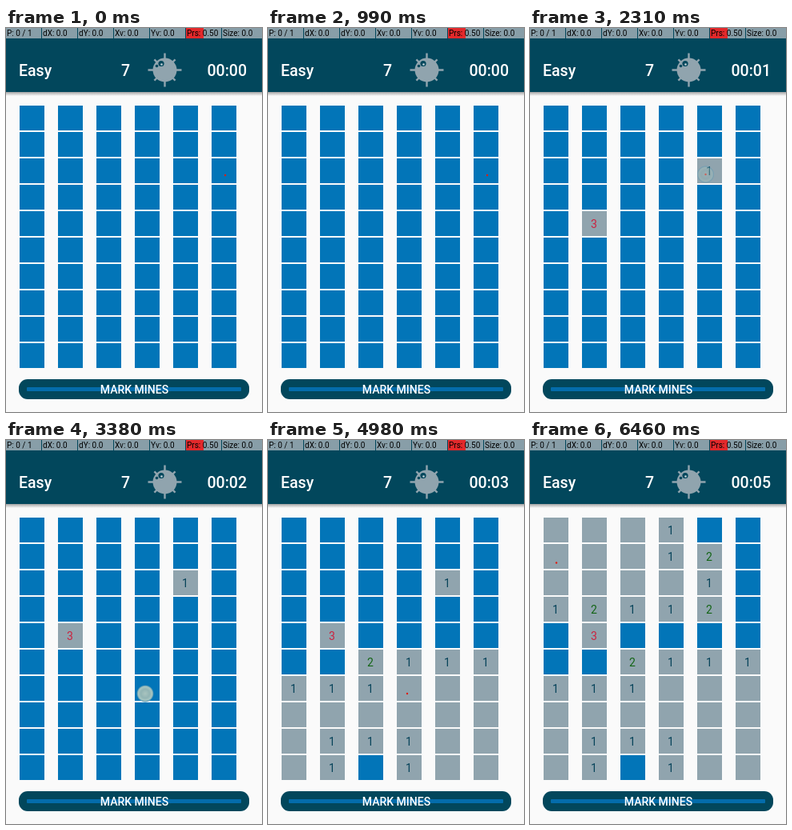
Write an HTML page with a canvas that moves like this. It is 320x480 px and loops after 7990 ms.

```html
<!DOCTYPE html>
<html lang="en">
<head>
<meta charset="utf-8">
<title>Minesweeper</title>
<style>
  html, body { margin: 0; width: 100%; height: 100%; overflow: hidden; background: #fafafa; }
  canvas { display: block; }
</style>
</head>
<body>
<canvas id="stage" width="320" height="480"></canvas>
<script>
const ctx = document.getElementById('stage').getContext('2d');
const LOOP = 7990;
const PAPER = '#fafafa', DARK = '#02475c', BLUE = '#0275b8', GREY = '#90a4ae';
const STATUS = '#889ea8', LEVEL = '#e3292b';
const DIGIT = { 1: '#07435a', 2: '#126414', 3: '#cb2340' };

// '#' stays covered, '.' opens empty
const BOARD = [
  '...1##', '...12#', '....1#', '12112#', '#3####',
  '##2111', '111...', '......', '.111..', '.1#1..'
];

const TAPS = [
  { x: 274, y: 184, down: -1000, open: -900, fade: -800, clear: -800 },
  { x: 84.5, y: 242.5, down: 1220, open: 1350, fade: 1500, clear: 1890 },
  { x: 219.5, y: 183, down: 2100, open: 2250, fade: 2350, clear: 2970 },
  { x: 174, y: 317, down: 3250, open: 3480, fade: 3590, clear: 4000 },
  { x: 33, y: 153.5, down: 6170, open: 6330, fade: 6460, clear: 6460 }
];
const TICKS = [2100, 3250, 4980, 6010, 6330];

function rect(x, y, w, h, color) {
  ctx.fillStyle = color;
  ctx.fillRect(x, y, w, h);
}

function disc(x, y, r, color) {
  ctx.fillStyle = color;
  ctx.beginPath();
  ctx.arc(x, y, r, 0, 7);
  ctx.fill();
}

function pill(x, y, w, h, r, color) {
  ctx.fillStyle = color;
  ctx.beginPath();
  ctx.roundRect(x, y, w, h, r);
  ctx.fill();
}

function text(str, x, y, font, color, align = 'left') {
  ctx.font = `${font} Roboto, sans-serif`;
  ctx.textAlign = align;
  ctx.fillStyle = color;
  ctx.fillText(str, x, y);
}

function drawStatus() {
  const labels = ['P: 0 / 1', 'dX: 0.0', 'dY: 0.0', 'Xv: 0.0', 'Yv: 0.0', 'Prs: 0.50', 'Size: 0.0'];
  rect(0, 0, 320, 13, DARK);
  labels.forEach((label, i) => {
    const x = i * 45;
    rect(x, 0, i < 6 ? 44 : 50, 13, STATUS);
    if (i === 5) rect(x, 0, 22, 13, LEVEL);
    text(label, x + 1, 10, '10px', '#000');
  });
}

function drawMine(x, y) {
  ctx.strokeStyle = GREY;
  ctx.lineWidth = 2.4;
  ctx.beginPath();
  for (let i = 0; i < 8; i++) {
    const a = i * Math.PI / 4, r = i % 2 ? 18.5 : 21;
    ctx.moveTo(x, y);
    ctx.lineTo(x + r * Math.cos(a), y + r * Math.sin(a));
  }
  ctx.stroke();
  disc(x, y, 15, GREY);
  disc(x - 4.5, y - 8, 3.6, DARK);
  disc(x - 4, y - 7, 1.3, '#c4d2d8');
  disc(x - 10, y - 5, 1.8, DARK);
}

function drawHeader(seconds) {
  const shadow = ctx.createLinearGradient(0, 80, 0, 85);
  shadow.addColorStop(0, 'rgba(60,60,60,.45)');
  shadow.addColorStop(1, 'rgba(60,60,60,0)');
  rect(0, 80, 320, 5, shadow);
  rect(0, 13, 320, 67, DARK);
  const font = '500 19.5px';
  text('Easy', 16, 60, font, '#fff');
  text('7', 144, 60, font, '#fff');
  text('00:0' + seconds, 301, 60, font, '#fff', 'right');
  drawMine(198.5, 52.5);
}

function openTime(row, col) {
  if (BOARD[row][col] === '#') return Infinity;
  if (row === 4) return TAPS[1].open;
  if (row === 2 && col === 4) return TAPS[2].open;
  return TAPS[row > 4 ? 3 : 4].open;
}

function drawBoard(t) {
  for (let row = 0; row < 10; row++) {
    for (let col = 0; col < 6; col++) {
      const x = 17 + 48 * col, y = 97 + 33 * row, cell = BOARD[row][col];
      const open = t >= openTime(row, col);
      rect(x, y, 31, 31, open ? GREY : BLUE);
      if (open && cell > 0) text(cell, x + 15, y + 21, '14px', DIGIT[cell], 'center');
    }
  }
}

function drawButton() {
  pill(16, 439, 288, 25, 11, DARK);
  pill(26, 449, 268, 5, 1, '#046cab');
  text('MARK MINES', 160.5, 457, '500 14px', '#fff', 'center');
}

function drawTouch(t) {
  const tap = TAPS.filter(p => t >= p.down).pop();
  disc(tap.x, tap.y, 1.2, '#e01c10');
  if (t >= tap.clear) return;
  const faded = Math.min(1, Math.max(0, (t - tap.open) / (tap.fade - tap.open)));
  const glow = ctx.createRadialGradient(tap.x, tap.y, 0, tap.x, tap.y, 11);
  glow.addColorStop(0, '#a9c4bf');
  glow.addColorStop(.5, '#92b4b4');
  glow.addColorStop(.78, '#a6c5c1');
  glow.addColorStop(.9, '#5f9cb4');
  glow.addColorStop(1, 'rgba(40,130,180,0)');
  ctx.globalAlpha = 1 - .94 * faded;
  disc(tap.x, tap.y, 11, glow);
  ctx.globalAlpha = 1;
}

function draw() {
  const t = performance.now() % LOOP;
  rect(0, 0, 320, 480, PAPER);
  drawHeader(TICKS.filter(tick => t >= tick).length);
  drawStatus();
  drawBoard(t);
  drawButton();
  drawTouch(t);
  requestAnimationFrame(draw);
}
draw();
</script>
</body>
</html>
```
